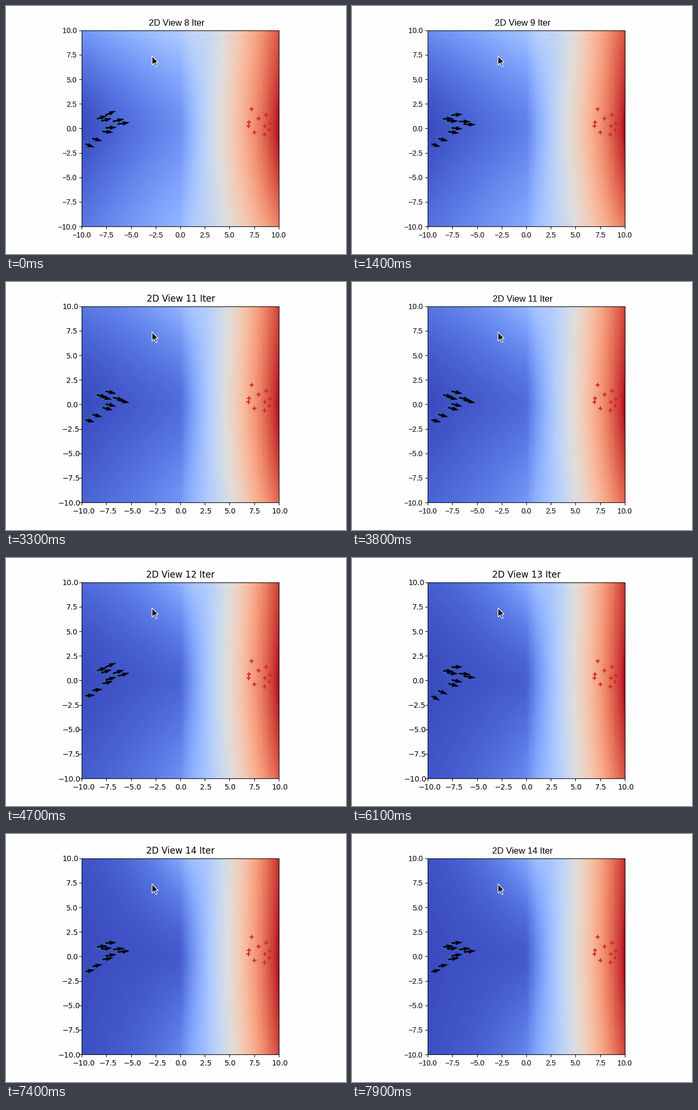
Recreate the animation shown at these times as a matplotlib script. Size 638 by 467 pixels, loop 8000 ms.

```python
import numpy as np
import matplotlib.pyplot as plt
from matplotlib.animation import FuncAnimation
from matplotlib.patches import Polygon
from matplotlib.transforms import IdentityTransform

W, H, DPI = 638, 467, 100
STEP, LOOP = 100, 8000
LEFT, BOTTOM, SIDE = 142.2, 51.8, 369.6
TITLE_CENTRE = 320
CHANGES = [600, 1400, 2000, 2400, 3300, 3800, 4700, 5200, 6100, 6900, 7400, 7900]
FIRST_ITER, LAST_ITER = 8, 14
PIXELS = IdentityTransform()

STARTS = np.array([(148, 260), (161, 250), (180, 237), (186, 230), (170, 213),
                   (178, 217), (186, 206), (200, 218), (209, 223)])
GOALS = np.array([(460, 194), (488, 205), (473, 212), (455, 219), (454, 227),
                  (485, 226), (494, 222), (465, 238), (493, 233), (484, 243)])

# Mean heading and its change per unit of height, in degrees.
STEERING = {8: (2, 15), 9: (-6, 7.5), 10: (5.5, 13), 11: (-13, 0),
            12: (13.5, 6), 13: (-12, 10), 14: (8, -3)}


def to_data(points):
    """Convert pixels counted from the top left to axes data."""
    x = (points[:, 0] + 0.5 - LEFT) / SIDE * 20 - 10
    y = (H - points[:, 1] + 0.5 - BOTTOM) / SIDE * 20 - 10
    return x, y


def surface(iteration):
    """A shallow plain on the left that breaks into a slope at x = 0."""
    progress = (iteration - FIRST_ITER) / (LAST_ITER - FIRST_ITER)
    cells = np.arange(-9.9, 10, 0.2)
    x, y = np.meshgrid(cells, cells)
    slope = np.clip(x / 10, 0, 1)
    plain = np.clip(x, -10, 0)

    base = 0.16 * np.exp(-1.6 * progress)
    ramp = slope + 0.015 * np.sin(2 * np.pi * slope)
    value = base * (1 + plain / 10) + (1 - base) * ramp

    # Away from the middle row the plain rises and the far right sinks.
    away = np.abs(y / 10) ** 1.4
    tilt = 0.3 * y / 10
    far, near = 0.14 * (1 - progress), 0.16
    lift = far + (near - far) * np.exp(plain / 4)
    lift /= 1 + np.exp(1.5 * (x - 1.8))
    drop = (0.15 - 0.09 * progress) * slope**1.5
    return np.clip(value + away * ((1 + tilt) * lift - (1 - tilt) * drop), 0, 1)


plt.rcParams["font.family"] = "Liberation Sans"
fig = plt.figure(figsize=(W / DPI, H / DPI), dpi=DPI, facecolor="#fefefe")
ax = fig.add_axes([LEFT / W, BOTTOM / H, SIDE / W, SIDE / H])
image = ax.imshow(surface(FIRST_ITER), cmap="coolwarm", vmin=0, vmax=1,
                  origin="lower", extent=(-10, 10, -10, 10),
                  interpolation="nearest", aspect="auto")
ticks = np.arange(-10, 10.1, 2.5)
ax.set(xticks=ticks, yticks=ticks, xlim=(-10, 10), ylim=(-10, 10))
title = ax.set_title(f"2D View {FIRST_ITER} Iter",
                     x=(TITLE_CENTRE - LEFT) / SIDE)

start_x, start_y = to_data(STARTS)
lengths = 19 + 4 * (start_x - start_x.min()) / np.ptp(start_x)
ax.plot(start_x, start_y, "+", color="tab:blue", ms=6, mew=1.5)
ax.plot(*to_data(GOALS), "+", color="tab:red", ms=6, mew=1.5)
arrows = ax.quiver(start_x, start_y, lengths, 0 * lengths, angles="uv",
                   scale=1, scale_units="dots", width=0.0075, zorder=3)

pointer = np.array([(274, 94), (274, 111), (278, 107.5), (281, 114),
                    (283.5, 113), (280.7, 106.5), (285.5, 106)])
pointer[:, 1] = H - pointer[:, 1]
fig.add_artist(Polygon(pointer, fc="#161616", ec="white", lw=0.9,
                       joinstyle="round", transform=PIXELS, zorder=10))

fig.canvas.draw()


def anchor(label):
    """Left end of a label's baseline in pixels."""
    box = label.get_window_extent()
    probe = fig.text(0, 0, label.get_text(), transform=PIXELS,
                     fontproperties=label.get_fontproperties())
    descent = probe.get_window_extent().y0
    probe.remove()
    return box.x0, box.y0 - descent


def wide_copy(label):
    return fig.text(*anchor(label), label.get_text(), transform=PIXELS,
                    family="DejaVu Sans", size=label.get_size())


narrow = ax.get_xticklabels() + ax.get_yticklabels() + [title]
wide = [wide_copy(label) for label in narrow]
wide_title = wide[-1]


def update(frame):
    state = int(np.searchsorted(CHANGES, frame * STEP, side="right"))
    iteration = FIRST_ITER + (state + 1) // 2
    image.set_data(surface(iteration))
    mean, spread = STEERING[iteration]
    heading = np.radians(mean + spread * start_y)
    arrows.set_UVC(lengths * np.cos(heading), lengths * np.sin(heading))

    text = f"2D View {iteration} Iter"
    title.set_text(text)
    wide_title.set_text(text)
    wide_title.set_x(title.get_window_extent().x0)

    # Every iteration appears in the wide face first, then in the narrow one.
    is_wide = state % 2 == 1
    for label in narrow:
        label.set_alpha(0 if is_wide else 1)
    for label in wide:
        label.set_visible(is_wide)
    return [image, arrows, *narrow, *wide]


animation = FuncAnimation(fig, update, frames=LOOP // STEP, interval=STEP,
                          repeat=True, repeat_delay=0, blit=False)
plt.show()
```
